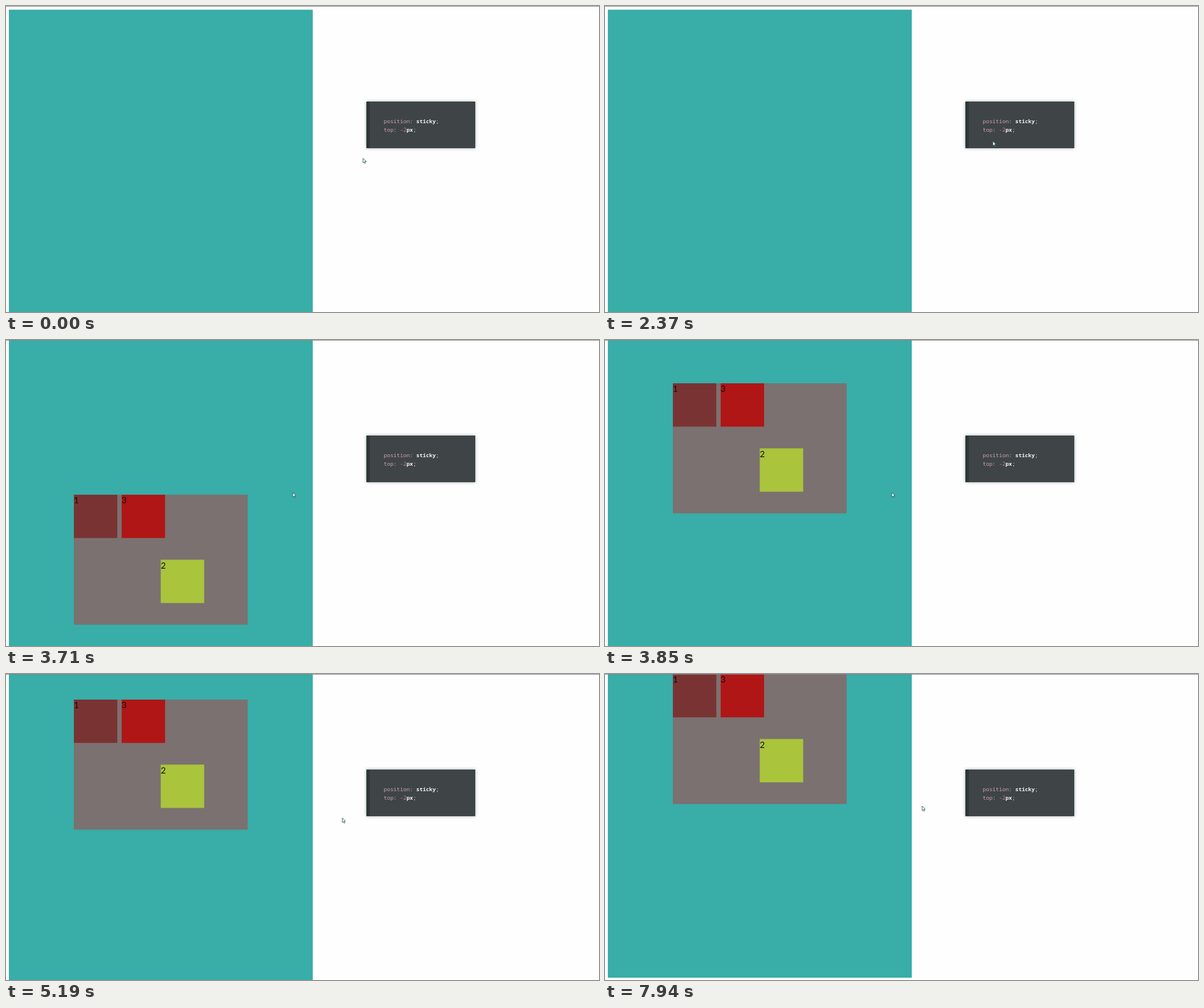
Animation, 1040 px wide and 538 px high, one loop 8 s. Source, as an HTML page:

```html
<!DOCTYPE html>
<html lang="en">
<head>
<meta charset="utf-8">
<title>Sticky position</title>
<style>
  html, body { margin: 0; width: 100%; height: 100%; overflow: hidden; background: #fff; }
  #stage { position: relative; width: 1040px; height: 538px; overflow: hidden; background: #fefefe; }
  #stage div, #cursor { position: absolute; left: 0; top: 0; }
  #stage #rule { width: 1040px; height: 1px; background: #858585; }
  #stage #page { left: 5px; width: 533px; height: 1400px; background: #39ada8; }
  #stage #below { top: 0; width: 1040px; height: 538px; background: #fefefe; }
  #grid { width: 400px; height: 300px; background: #7b7170; transform-origin: 0 0; }
  #grid div { width: 100px; height: 100px; font: 20px/24px Lato, sans-serif; color: #0c0c0c; }
  #one { background: #7a3333; }
  #stage #three { left: 110px; background: #b01616; }
  #stage #two { left: 200px; top: 150px; background: #aac43c; }
  #stage #code {
    left: 632px; top: 168px; width: 190.5px; height: 81.5px; box-sizing: border-box;
    border-left: 6px solid #2e3638; background: #3f4446;
    box-shadow: 0 0 5px rgba(0, 30, 30, .4);
  }
  #code pre {
    margin: 0; position: absolute; left: 24.5px; top: 27px;
    font: 9.5px/15.3px "Noto Sans Mono", "DejaVu Sans Mono", monospace; color: #dcdcdc;
  }
  #code i { font-style: normal; color: #d0a3b1; }
  #code em { font-style: normal; color: #c58093; }
  #code b { font-weight: 600; color: #f4f4f4; }
  #cursor { overflow: visible; }
</style>
</head>
<body>
<div id="stage">
  <div id="page"></div>
  <div id="below"></div>
  <div id="grid">
    <div id="one">1</div>
    <div id="three">3</div>
    <div id="two">2</div>
  </div>
  <div id="rule"></div>
  <div id="code"><pre><i>position</i>: <b>sticky</b>;
<i>top</i>: <em>-2</em><b>px</b>;</pre></div>
  <svg id="cursor" width="8" height="11">
    <path d="M.6 .6V8.7L2.5 7L3.7 9.8L5 9.2L3.8 6.5H6.3Z"
      fill="#e9ffff" stroke="#1c4348" stroke-width=".8" stroke-linejoin="round"/>
  </svg>
</div>
<script>
  const LOOP = 8000;
  const ZOOM = 0.762;
  const PAGE_TOP = 6.5;
  const GRID_TOP = 573;
  const WHEEL = 264;           // distance of one wheel scroll
  const WHEEL_TIME = 385;
  const wheelStarts = [3010, 3585, 6170, 7555];
  const PAGE_END = 534 + WHEEL * wheelStarts.length;

  // Pointer moves: start ms, end ms, destination x, y.
  const home = [625.5, 267];
  const moves = [
    [320, 1120, 676, 222],
    [1190, 1400, 666, 222],
    [1400, 1900, 706, 233],
    [2010, 2370, 679.5, 237],
    [2370, 3050, 502.3, 267.5],
    [4790, 5580, 672, 238],
    [5780, 6160, 555.5, 234],
    [7060, 7130, 555.5, 231.5]
  ];

  const el = id => document.getElementById(id);
  const progress = (t, from, to) => Math.min(1, Math.max(0, (t - from) / (to - from)));
  const smooth = p => (1 - Math.cos(Math.PI * p)) / 2;
  const cubicInOut = p => p < .5 ? 4 * p ** 3 : 1 - 4 * (1 - p) ** 3;

  function scrollAt(t) {
    return wheelStarts.reduce((sum, start) =>
      sum + WHEEL * cubicInOut(progress(t, start, start + WHEEL_TIME)), 0);
  }

  function pointerAt(t) {
    let [x, y] = home;
    for (const [from, to, toX, toY] of moves) {
      const p = smooth(progress(t, from, to));
      x += (toX - x) * p;
      y += (toY - y) * p;
    }
    return [x, y];
  }

  function place(id, x, y, scale = 1) {
    el(id).style.transform = `translate(${x}px, ${y}px) scale(${scale})`;
  }

  function draw(t) {
    const scroll = scrollAt(t);
    place('page', 0, Math.max(0, PAGE_TOP - scroll));
    place('below', 0, Math.min(538, PAGE_END - scroll));
    place('grid', 119, Math.max(0, GRID_TOP - scroll), ZOOM);
    place('cursor', ...pointerAt(t));
  }

  const start = performance.now();
  function tick() {
    draw((performance.now() - start) % LOOP);
    requestAnimationFrame(tick);
  }
  draw(0);
  requestAnimationFrame(tick);
</script>
</body>
</html>
```
